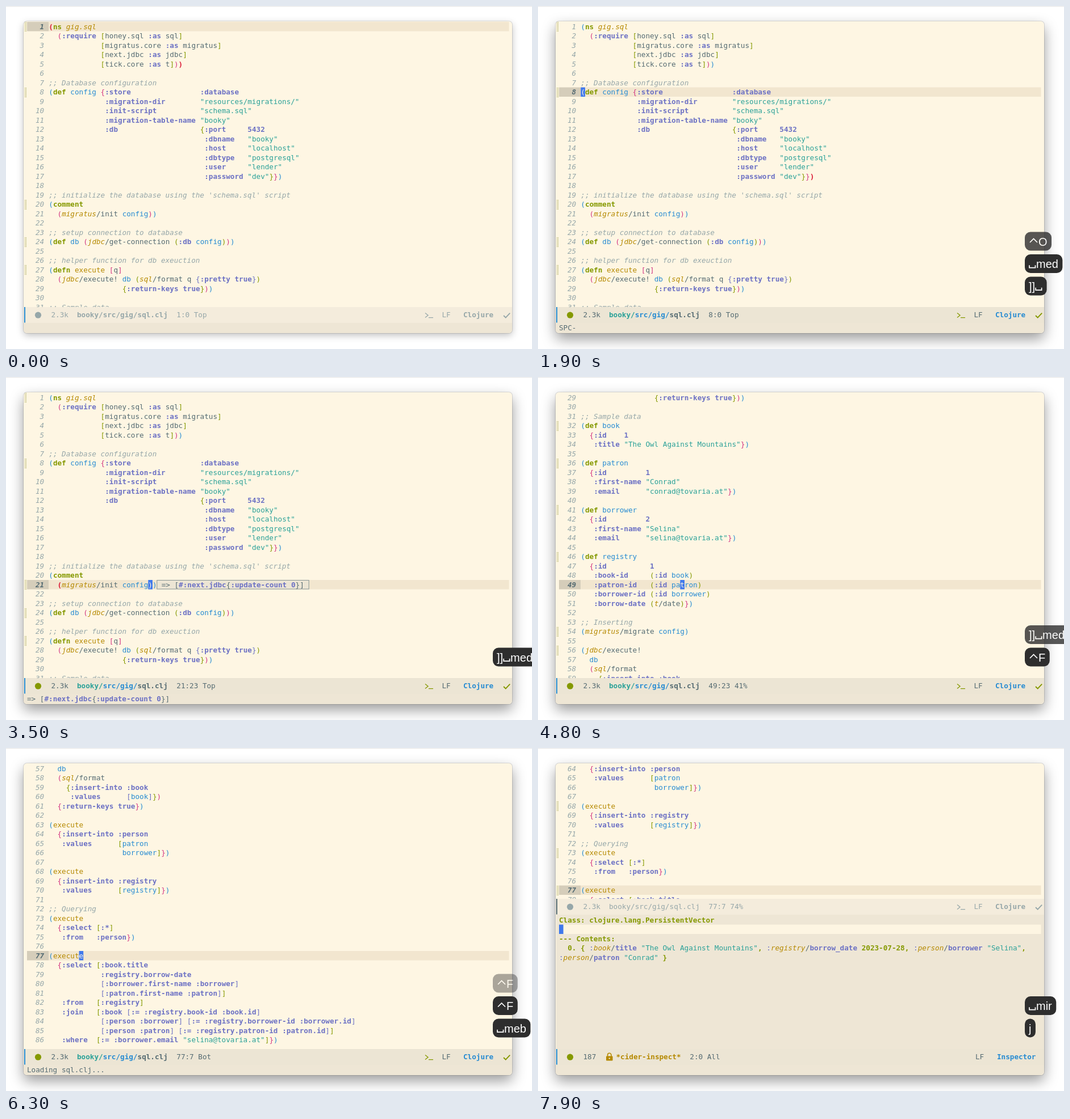
An HTML page for the animation above (8 s loop, 926 by 605 pixels).

```html
<!DOCTYPE html>
<html lang="en">
<head>
<meta charset="utf-8">
<title>Editor session</title>
<style>
  html, body { margin: 0; width: 100%; height: 100%; overflow: hidden; background: #fff; }
  #win { position: absolute; left: 31px; top: 27px; width: 860px; height: 550px; border-radius: 6px;
    box-shadow: 0 0 1px rgba(0,0,0,.45), 0 4px 13px rgba(0,0,0,.25); }
  #win.focus { box-shadow: 0 0 1px rgba(0,0,0,.5), 0 10px 25px rgba(0,0,0,.4); }
  svg { position: absolute; left: 0; top: 0; }
  text { font: 12.64px "DejaVu Sans Mono", "Noto Sans Mono", monospace; fill: #556b72; white-space: pre; }
  .kw { fill: #6c71c4; font-weight: 700; }
  .col { fill: #6c71c4; }
  .def { fill: #859900; font-weight: 700; }
  .fn { fill: #b58900; }
  .ns { fill: #b58900; font-style: italic; }
  .star { fill: #b58900; font-weight: 700; }
  .var, .p1 { fill: #268bd2; }
  .p2 { fill: #d33682; }
  .p3 { fill: #859900; }
  .p4 { fill: #6c71c4; }
  .str { fill: #2aa198; }
  .com, .num { fill: #96a7a9; font-style: italic; }
  .cur { font-style: italic; font-weight: 700; }
  .match { fill: #dc1f3a; font-weight: 700; }
  .inv { fill: #fef6e3; }
  .bold { font-weight: 700; }
  .root { fill: #2aa198; font-weight: 700; }
  .path { fill: #268bd2; font-weight: 700; }
  .dim { fill: #96a7a9; }
  .dimb { fill: #96a7a9; font-weight: 700; }
  .key { font: 20px "Liberation Sans", Arial, sans-serif; fill: #fff; }
</style>
</head>
<body>
<div id="win"></div>
<svg id="stage" width="926" height="605" viewBox="0 0 926 605"></svg>
<script>
const LOOP = 8000, STEP = 100;
const CW = 7.61, LH = 16.5, TOP = 28, LEFT = 75.3;
const PAPER = '#fef6e3', ALT = '#eee6d5', HL = '#f2e6cf', BLUE = '#268bd2', GREEN = '#859900', GREY = '#96a7a9';

const source = `(ns gig.sql
  (:require [honey.sql :as sql]
            [migratus.core :as migratus]
            [next.jdbc :as jdbc]
            [tick.core :as t]))

;; Database configuration
(def config {:store                :database
             :migration-dir        "resources/migrations/"
             :init-script          "schema.sql"
             :migration-table-name "booky"
             :db                   {:port     5432
                                    :dbname   "booky"
                                    :host     "localhost"
                                    :dbtype   "postgresql"
                                    :user     "lender"
                                    :password "dev"}})

;; initialize the database using the 'schema.sql' script
(comment
  (migratus/init config))

;; setup connection to database
(def db (jdbc/get-connection (:db config)))

;; helper function for db exeuction
(defn execute [q]
  (jdbc/execute! db (sql/format q {:pretty true})
                 {:return-keys true}))

;; Sample data
(def book
  {:id    1
   :title "The Owl Against Mountains"})

(def patron
  {:id         1
   :first-name "Conrad"
   :email      "conrad@tovaria.at"})

(def borrower
  {:id         2
   :first-name "Selina"
   :email      "selina@tovaria.at"})

(def registry
  {:id          1
   :book-id     (:id book)
   :patron-id   (:id patron)
   :borrower-id (:id borrower)
   :borrow-date (t/date)})

;; Inserting
(migratus/migrate config)

(jdbc/execute!
  db
  (sql/format
    {:insert-into :book
     :values      [book]})
  {:return-keys true})

(execute
  {:insert-into :person
   :values      [patron
                 borrower]})

(execute
  {:insert-into :registry
   :values      [registry]})

;; Querying
(execute
  {:select [:*]
   :from   :person})

(execute
  {:select [:book.title
            :registry.borrow-date
            [:borrower.first-name :borrower]
            [:patron.first-name :patron]]
   :from   [:registry]
   :join   [:book [:= :registry.book-id :book.id]
            [:person :borrower] [:= :registry.borrower-id :borrower.id]
            [:person :patron] [:= :registry.patron-id :patron.id]]
   :where  [:= :borrower.email "selina@tovaria.at"]})`.split('\n');

// Splits code into [column, text, class]; nest.depth carries bracket depth across lines.
function lex(line, nest) {
  const out = [];
  for (const m of line.matchAll(/;.*|"[^"]*"|#?:[^\s()\[\]{}"]+|[()\[\]{}]|[^\s()\[\]{}"]+/g)) {
    const s = m[0], at = m.index, add = (cls) => out.push([at, s, cls]);
    const slash = s.indexOf('/');
    if (s[0] === ';') add('com');
    else if (s[0] === '"') add('str');
    else if (/^#?:/.test(s) || /^(\d+|true|nil)$/.test(s)) add('kw');
    else if ('([{'.includes(s)) add(nest ? 'p' + ++nest.depth : '');
    else if (')]}'.includes(s)) add(nest ? 'p' + nest.depth-- : '');
    else if (slash > 0) {
      out.push([at, s.slice(0, slash), 'ns'], [at + slash, s.slice(slash), '']);
    }
    else if (/^(ns|def|defn|comment)$/.test(s)) add('def');
    else if (s === 'execute') add('fn');
    else if (s === 'gig.sql') add('ns');
    else if (/^(config|db|book|patron|borrower|registry)$/.test(s)) add('var');
    else add('');
  }
  return out;
}
const nest = { depth: 0 };
const code = source.map(line => lex(line, nest));
const forms = source.map((s, i) => s[0] === '(' ? i + 1 : 0).filter(Boolean);

// Timelines: the last entry whose time has come is in force.
const at = (list, t) => list.filter(e => e[0] <= t).pop();
const cursorAt = [[0, 1, 0], [1800, 8, 0], [2500, 20, 0], [2600, 21, 0], [2800, 21, 24], [3000, 21, 23], [4800, 49, 23], [5400, 77, 7]];
const scrollAt = [[0, 1, 'Top'], [4800, 29, '41%'], [5400, 57, 'Bot'], [7300, 64, '74%']];
const matchAt = [[0, '1:0', '5:30'], [1900, '8:0', '17:53'], [2700], [2900, '20:0', '21:24'], [3100, '21:2', '21:23'], [4800]];
const resultAt = [[0], [1300, 5, 'nil'], [1700], [2200, 17, "#'gig.sql/config"], [2400],
  [3500, 21, '[#:next.jdbc{:update-count 0}]'], [4800]];
const echoAt = [[0, ''], [900, 'SPC-'], [1000, 'SPC m-'], [1100, 'SPC m e-'], [1300, '=> nil'],
  [1700, ']-'], [1800, '] ]'], [1900, 'SPC-'], [2000, 'SPC m-'], [2100, 'SPC m e-'], [2200, "=> #'gig.sql/config"],
  [2400, ']-'], [2500, '] ]'], [2600, ''], [3100, 'SPC-'], [3200, 'SPC m-'], [3300, 'SPC m e-'],
  [3500, '=> [#:next.jdbc{:update-count 0}]'], [4800, ''],
  [5900, 'SPC-'], [6000, 'SPC m-'], [6100, 'SPC m e-'], [6200, 'Loading sql.clj...'], [6400, 'Loaded sql.clj'], [6700, ''],
  [7000, 'SPC-'], [7100, 'SPC m-'], [7200, 'SPC m i-'], [7300, '']];

// Key badges: typed text and the time of each key.
const badges = [
  ['^O', [500, 500]],
  ['_med', [900, 1000, 1100, 1300]],
  [']]_med]]j$h_med', [1700, 1800, 1900, 2000, 2100, 2200, 2400, 2500, 2600, 2800, 3000, 3100, 3200, 3300, 3400]],
  ['^F', [4800, 4800]],
  ['^F', [5400, 5400]],
  ['_meb', [5900, 6000, 6100, 6200]],
  ['_mir', [7000, 7100, 7200, 7300]],
  ['j', [7800]]
];
const HOLD = 1350, FADE = 250;

const rect = (x, y, w, h, fill, more = '') =>
  `<rect x="${x}" y="${y}" width="${w}" height="${h}" fill="${fill}" ${more}/>`;
const text = (x, y, s, cls = '') => `<text x="${x.toFixed(2)}" y="${y.toFixed(2)}" class="${cls}">${s}</text>`;
const line = (d, color, w) => `<path d="${d}" fill="none" stroke="${color}" stroke-width="${w}"/>`;
const tokens = (x, y, list) => list.map(([c, s, cls]) => text(x + c * CW, y, s, cls)).join('');
function run(x, y, parts) {
  let c = 0;
  return parts.map(([s, cls]) => {
    const out = text(x + c * CW, y, s, cls);
    c += s.length;
    return out;
  }).join('');
}

function fringe(y) {
  const top = Math.round(y);
  return `<path d="M33.5 ${top}v17M35.5 ${top}v17" stroke="#a3a552" stroke-width="1" stroke-dasharray="1 1"/>`;
}

function buffer(t, split) {
  const [, row, col] = at(cursorAt, t), first = at(scrollAt, t)[1];
  const marks = at(matchAt, t), [, resRow, res] = at(resultAt, t);
  const evaluated = t < 3500 ? forms : forms.map(n => n === 20 ? 21 : n);
  const flushed = t >= 6200 && t < 6400;
  const bottom = split ? 266 : 531;
  let out = '';
  for (let n = first; n <= code.length; n++) {
    const y = TOP + (n - first) * LH, base = y + 12.5;
    if (y > bottom) break;
    if (n === row) out += rect(37, y, 38.3, LH, '#d5cdba') + rect(75.3, y, 810.2, LH, HL);
    if (evaluated.includes(n) && !flushed) out += fringe(y);
    const label = String(n);
    out += text(67.2 - label.length * CW, base, label, n === row ? 'cur' : 'num');
    out += tokens(LEFT, base, code[n - 1].map(([c, s, cls]) => [c, s, marks.includes(n + ':' + c) ? 'match' : cls]));
    if (n === row && t >= 500 && !split) {
      const x = LEFT + col * CW;
      out += rect(x, y, CW, LH, '#4079ec') + text(x, base, source[n - 1][col] || '', 'inv');
    }
    if (n === resRow) {
      const x = LEFT + source[n - 1].length * CW;
      out += rect(x + .3, y + .5, (res.length + 5) * CW + 1, LH - 1, '#ece5d4', 'stroke="#879494"');
      out += tokens(x + CW + .5, base, lex('=> ' + res, null));
    }
  }
  return `<g clip-path="url(#${split ? 'half' : 'full'})">${out}</g>`;
}

function modeBase(y, on, bar) {
  return rect(32, y, 859, 28, on ? '#ece5d4' : '#f4ecdc') + rect(32, y, 2, 27.5, bar) +
    `<circle cx="56.5" cy="${y + 14.2}" r="5.6" fill="${on ? GREEN : GREY}"/>`;
}

function codeMode(t, y, on, split) {
  const [, row, col] = at(cursorAt, t), b = y + 18.3, cls = on ? '' : 'dim', icon = on ? GREEN : GREY;
  const name = split ? 'dim' : 'dimb';
  return modeBase(y, on, split ? '#556b72' : BLUE) + text(79.5, b, '2.3k', cls) +
    run(125, b, [['booky/', on ? 'root' : name], ['src/gig/', on ? 'path' : name], ['sql.clj', on ? 'bold' : name]]) +
    text(300.3, b, `${row}:${col} ${at(scrollAt, t)[2]}`, cls) +
    line(`M738 ${y + 10.5}l5 4l-5 4M744 ${y + 18.7}h8`, icon, 1.3) +
    text(767.5, b, 'LF', cls) + text(805, b, 'Clojure', on ? 'path' : 'dimb') +
    line(`M876 ${y + 15}l3.7 3.7l7.5 -8`, icon, 1.9);
}

function inspector(t) {
  const row = t < 7800 ? 0 : 1, y0 = 295, base = i => y0 + i * LH + 12.5, x = 37;
  const key = (ns, name) => [[':', 'col'], [ns, 'ns'], ['/', ''], [name, 'kw'], [' ', '']];
  const b = 549.3;
  return rect(32, 294, 859, 237, ALT) + rect(x, y0 + row * LH, 848.5, LH, '#fdf5e2') +
    text(x, base(0), 'Class: clojure.lang.PersistentVector', 'def') +
    rect(x, y0 + row * LH, CW, LH, '#4079ec') + (row ? '' : text(x, base(0), 'C', 'inv')) +
    text(x, base(2), '--- Contents:', 'def') +
    run(x, base(3), [['  0. { ', 'def'], ...key('book', 'title'), ['"The Owl Against Mountains"', 'str'], [', ', 'def'],
      ...key('registry', 'borrow_date'), ['2023-07-28, ', 'def'], ...key('person', 'borrower'), ['"Selina"', 'str'], [',', 'def']]) +
    run(x, base(4), [...key('person', 'patron'), ['"Conrad"', 'str'], [' }', 'def']]) +
    modeBase(531, true, BLUE) + text(79.5, b, '187') +
    rect(120, 543.5, 11.5, 8, '#b58900', 'rx="1"') + line('M122.5 544v-2.5a3.2 3.2 0 0 1 6.4 0v2.5', '#b58900', 1.6) +
    `<circle cx="125.7" cy="547.5" r="1.2" fill="${ALT}"/>` +
    text(137.5, b, '*cider-inspect*', 'star') + text(267.3, b, `${row + 1}:0 All`) +
    text(770, b, 'LF') + text(808, b, 'Inspector', 'path');
}

const pen = document.createElement('canvas').getContext('2d');
pen.font = '20px "Liberation Sans", Arial, sans-serif';

function badge(keys, y, alpha) {
  let x = 864, out = '';
  const b = y + 24.2;
  for (const k of keys) {
    if (k === '^') {
      out += line(`M${x + 2} ${y + 18.5}l6.5 -6.5l6.5 6.5`, '#fff', 1.7);
      x += 17;
    } else if (k === '_') {
      out += line(`M${x + 1} ${b - 5}v4.5h10.5v-4.5`, '#fff', 1.7);
      x += 13;
    } else {
      out += text(x, b, k, 'key');
      x += pen.measureText(k).width;
    }
  }
  const w = x + 7.5 - 857;
  return `<g opacity="${alpha}">${rect(857, y, w, 33, '#2e2e2e', `rx="${Math.min(10, w / 2)}"`)}${out}</g>`;
}

function keyCast(t) {
  const shown = badges.filter(b => b[1][0] <= t).reverse();
  return shown.map(([keys, times], slot) => {
    const typed = times.filter(k => k <= t), age = t - typed[typed.length - 1];
    const alpha = Math.min(1, 1 - (age - HOLD) / FADE);
    return alpha > 0 ? badge(keys.slice(0, typed.length), 477.5 - slot * 39.5, alpha) : '';
  }).join('');
}

const stage = document.getElementById('stage'), win = document.getElementById('win');

function draw(t) {
  const focus = t >= 500, split = t >= 7300;
  win.className = focus ? 'focus' : '';
  stage.innerHTML = `<defs>
      <clipPath id="frame"><rect x="31" y="27" width="860" height="550" rx="6"/></clipPath>
      <clipPath id="full"><rect x="31" y="27" width="860" height="504"/></clipPath>
      <clipPath id="half"><rect x="31" y="27" width="860" height="239"/></clipPath>
    </defs>` + rect(0, 0, 926, 1, '#e4e4e4') +
    `<g clip-path="url(#frame)">` + rect(31, 27, 860, 550, PAPER) + rect(31, 559, 860, 18, ALT) +
    buffer(t, split) +
    (split ? codeMode(t, 266, false, true) + inspector(t) : codeMode(t, 531, focus, false)) +
    tokens(37, 571.8, lex(at(echoAt, t)[1], null)) + '</g>' +
    rect(30.5, 26.5, 861, 551, 'none', 'rx="6" stroke="#000" stroke-opacity=".07"') +
    keyCast(t);
}

let last = -1;
function tick(now) {
  const t = Math.floor(now % LOOP / STEP) * STEP;
  if (t !== last) draw(last = t);
  requestAnimationFrame(tick);
}
draw(0);
requestAnimationFrame(tick);
</script>
</body>
</html>
```
